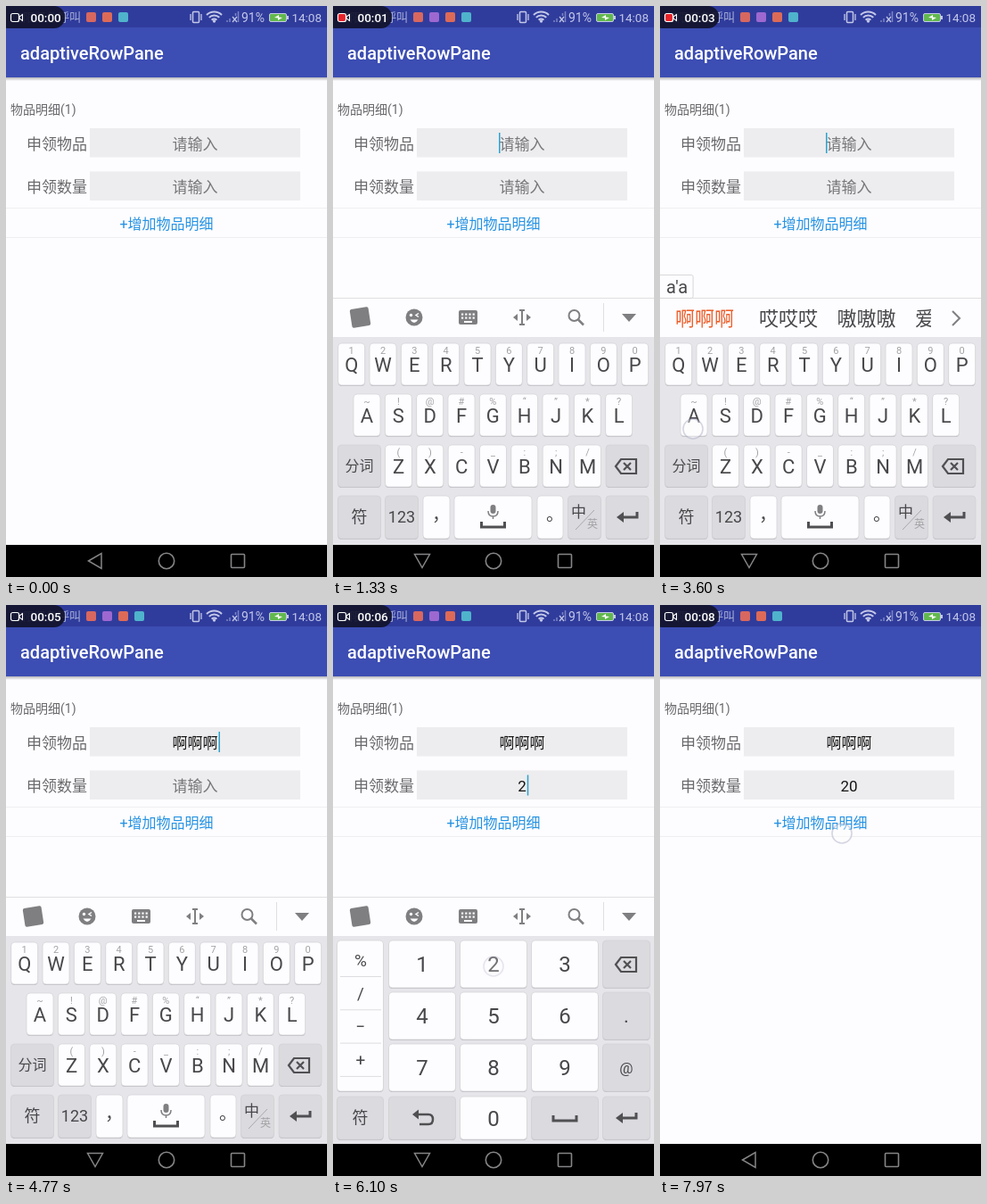
Animation, 360 px wide and 640 px high, one loop 8 s. Source, as an HTML page with a canvas:

```html
<!DOCTYPE html>
<html lang="zh-CN">
<head>
<meta charset="utf-8">
<style>
html, body { margin: 0; width: 100%; height: 100%; overflow: hidden; background: #fdfcfe; }
canvas { display: block; }
</style>
</head>
<body>
<canvas id="stage" width="360" height="640"></canvas>
<script>
const ctx = document.getElementById('stage').getContext('2d');
const FONT = 'Roboto, "Noto Sans CJK SC", sans-serif';
const LOOP = 8000, KB_TOP = 327, KB_HEIGHT = 313;
const KB_SHOW = 1065, QWERTY_HIDE = 5269, NUM_SHOW = 5650, KB_HIDE = 7031;
const COMMIT = 4550, FOCUS_2 = 5220, BLUR = 6990;
const PAPER = '#fdfcfe', ICON = '#7f7e81', INK = '#48474a', MARK = '#504f52', GRAY_KEY = '#dbdade';

const clamp = v => Math.max(0, Math.min(1, v));
const latest = (list, t) => list.filter(item => item[0] <= t).pop();

function rect(x, y, w, h, color) {
  ctx.fillStyle = color;
  ctx.fillRect(x, y, w, h);
}
function round(x, y, w, h, r, fill, stroke, width = 1) {
  ctx.beginPath();
  ctx.roundRect(x, y, w, h, r);
  paint(fill, stroke, width);
}
function circle(x, y, r, fill, stroke, width = 1) {
  ctx.beginPath();
  ctx.arc(x, y, r, 0, 7);
  paint(fill, stroke, width);
}
function paint(fill, stroke, width) {
  if (fill) { ctx.fillStyle = fill; ctx.fill(); }
  if (stroke) { ctx.strokeStyle = stroke; ctx.lineWidth = width; ctx.stroke(); }
}
function path(d, fill, stroke, width = 1.5) {
  const p = new Path2D(d);
  if (fill) { ctx.fillStyle = fill; ctx.fill(p); }
  if (stroke) { ctx.strokeStyle = stroke; ctx.lineWidth = width; ctx.stroke(p); }
}
// y is the visual middle of the line
function text(s, x, y, size, color, align = 'center', weight = 400) {
  ctx.font = `${weight} ${size}px ${FONT}`;
  ctx.textAlign = align;
  ctx.fillStyle = color;
  ctx.fillText(s, x, y + size * 0.36);
}

function statusBar(t, keyboardOn) {
  rect(0, 0, 360, 24, '#303c9c');
  text('仅限紧急呼叫', 6, 12.5, 13, '#a9b0da', 'left');
  const apps = keyboardOn ? ['#d8675f', '#9d68d0', '#dd6a57', '#4fb3cc'] : ['#d8675f', '#dd6a57', '#4fb3cc'];
  apps.forEach((c, i) => round(90 + i * 18, 7, 11, 11, 2, c));

  const pale = '#c3c8e8';
  round(209.5, 6.5, 7, 12, 1, null, pale, 1.5);
  path('M207 9V16M219 9V16', null, pale, 1.3);
  for (const r of [4, 8, 12]) {
    ctx.beginPath();
    ctx.arc(233.5, 18.5, r, -2.36, -0.78);
    paint(null, pale, 2);
  }
  circle(233.5, 17, 1.7, pale);
  path('M248 18V16M251 18V14M260.500 18V6M257.500 11V8', null, '#7b84c3', 1.5);
  path('M254 12L259 18M259 12L254 18', null, pale, 1.2);
  text('91%', 264, 13, 14, pale, 'left');
  round(295.5, 8.5, 19, 9, 1.5, '#62b84e', pale);
  rect(315, 11, 2, 4, pale);
  path('M301 13L306 10V12.500L310 13L305 16V13.500Z', '#fff');
  text('14:08', 354, 13, 13.5, pale, 'right');

  round(-10, 0, 76, 25, 12, 'rgba(17,18,42,.9)');
  const second = t / 1000, frac = second % 1;
  const red = frac >= 0.33 && frac < 0.67;
  round(5.5, 8.5, 9, 9, 2, red ? '#e8232a' : null, '#fff', 1.2);
  path('M15 12L18.500 9.500V16.500L15 14Z', null, '#fff', 1.1);
  text('00:0' + Math.floor(second + 0.33), 27.5, 13, 13.5, '#fff', 'left', 500);
}

function appBar() {
  rect(0, 24, 360, 56, '#3c4db3');
  const shade = ctx.createLinearGradient(0, 80, 0, 84);
  shade.addColorStop(0, 'rgba(0,0,0,.28)');
  shade.addColorStop(1, 'rgba(0,0,0,0)');
  rect(0, 80, 360, 4, shade);
  text('adaptiveRowPane', 16, 53, 20, '#fff', 'left', 500);
}

function field(label, y, value, cursor) {
  text(label, 23, y + 17.5, 17, '#69686b', 'left');
  rect(94, y, 236, 32.5, '#edecee');
  text(value || '请输入', 212, y + 17.5, 17, value ? '#151515' : '#777679');
  if (cursor) rect(value ? 213 + ctx.measureText(value).width / 2 : 186, y + 5, 1.5, 23, '#2ba3cf');
}

function form(t) {
  const restart = latest([[900], [3500], [COMMIT], [FOCUS_2], [6100], [6500]], t);
  const cursor = restart && t < BLUR && Math.floor((t - restart[0]) / 500) % 2 === 0;
  const amount = latest([[0, ''], [6100, '2'], [6500, '20']], t)[1];
  text('物品明细(1)', 5, 115.5, 14, '#69686b', 'left');
  field('申领物品', 137, t >= COMMIT ? '啊啊啊' : '', cursor && t < FOCUS_2);
  field('申领数量', 185.5, amount, cursor && t >= FOCUS_2);
  rect(0, 226, 360, 1, '#efeef0');
  rect(0, 259, 360, 1, '#efeef0');
  text('+增加物品明细', 180, 244.5, 16, '#2593e3');
}

function key(x, y, w, h, fill = PAPER) {
  round(x, y + 1, w, h, 4, '#c2c1c5');
  round(x, y, w, h, 4, fill, '#d2d1d5', 0.7);
}
function letterRow(letters, hints, x, y) {
  [...letters].forEach((c, i) => {
    const cx = x + i * 35.33;
    key(cx - 15, y, 30, 47);
    text(hints[i], cx, y + 8.5, 11, '#a3a2a5');
    text(c, cx, y + 24, 22, INK);
  });
}
function labelKey(s, x, y, w, h, size, fill) {
  key(x, y, w, h, fill);
  text(s, x + w / 2, y + h / 2, size, INK);
}
function backspace(x, y) {
  path(`M${x - 12} ${y}l6 -8h17v16h-17zM${x - 3} ${y - 4}l8 8m0 -8l-8 8`, null, MARK, 2.2);
}
function enter(x, y) {
  path(`M${x + 11} ${y - 6}v6h-17`, null, MARK, 3);
  path(`M${x - 12} ${y}l8 -6v12z`, MARK);
}
function spaceMark(x, y) {
  path(`M${x - 13} ${y - 6}v6h26v-6`, null, MARK, 3);
}

function toolbar() {
  ctx.save();
  ctx.translate(30.5, 349);
  ctx.rotate(-0.15);
  round(-10.5, -10.5, 21, 21, 2, ICON);
  ctx.restore();
  circle(91, 349, 9.5, ICON);
  circle(87.5, 346.5, 1.7, PAPER);
  path('M96 344.500L93 346.500L96 348.500', null, PAPER, 1.5);
  path('M86.500 351.500Q91 358.500 95.500 351.500Z', PAPER);
  round(141, 341, 21, 16, 2, ICON);
  for (let i = 0; i < 8; i++) rect(144 + i % 4 * 4.2, 344.5 + (i >> 2) * 4, 2.2, 2.2, PAPER);
  rect(147, 353, 9, 2, PAPER);
  path('M209 341H215M212 341V357M209 357H215', null, ICON, 2);
  path('M202 349L207 345V353ZM222 349L217 345V353Z', ICON);
  circle(270.5, 347, 6, null, ICON, 2);
  path('M275 351.500L281 357.500', null, ICON, 2.5);
  rect(303, 333, 1, 32, '#dfdee1');
  path('M324 345H340L332 354Z', ICON);
}

function candidates(words) {
  let x = 17;
  ctx.save();
  ctx.beginPath();
  ctx.rect(0, KB_TOP, 304, 45);
  ctx.clip();
  words.split(' ').forEach((word, i) => {
    text(word, x, 350, 22, i ? INK : '#ec5f2b', 'left', i ? 400 : 500);
    x += word.length * 22 + (i === 0 ? 28 : 21.5);
  });
  ctx.restore();
  path('M328 342L336 350L328 358', null, ICON, 2);
}

function qwerty() {
  letterRow('QWERTYUIOP', '1234567890', 20.7, 378);
  letterRow('ASDFGHJKL', '~!@#%“”*?', 38, 435);
  letterRow('ZXCVBNM', '()-_:;/', 73.5, 492);
  labelKey('分词', 5.5, 492, 48, 47, 16, GRAY_KEY);
  key(306, 492, 48, 47, GRAY_KEY);
  backspace(329, 516);
  labelKey('符', 5.5, 549, 48, 48, 18, GRAY_KEY);
  labelKey('123', 58.5, 549, 37, 48, 18, GRAY_KEY);
  key(101, 549, 30, 48);
  text('，', 121, 570, 20, INK);
  key(136, 549, 87, 48);
  round(176.5, 559, 6, 10, 3, ICON);
  path('M174 566Q174 572 179.500 572T185 566M179.500 572V575', null, ICON, 1.5);
  spaceMark(179.5, 584);
  key(229, 549, 29, 48);
  text('。', 249, 570, 20, INK);
  key(263.5, 549, 37, 48, GRAY_KEY);
  text('中', 275.5, 567, 17, INK);
  text('英', 291, 581, 12, '#a3a2a5');
  path('M272 587L293 565', null, '#a9a8ab', 1);
  key(306, 549, 48, 48, GRAY_KEY);
  enter(330, 573);
}

function numberPad() {
  key(4.5, 376, 52, 169);
  [...'%/−+'].forEach((c, i) => {
    text(c, 31, 398 + i * 37, 19, INK);
    rect(8, 416 + i * 37.3, 46, 1, '#dddce0');
  });
  for (let i = 0; i < 9; i++) {
    labelKey(String(i + 1), 62.5 + i % 3 * 80, 376 + Math.floor(i / 3) * 58, 75, 53, 24);
  }
  key(302.5, 376, 53, 53, GRAY_KEY);
  backspace(329, 403);
  labelKey('.', 302.5, 434, 53, 53, 22, GRAY_KEY);
  labelKey('@', 302.5, 492, 53, 53, 17, GRAY_KEY);
  labelKey('符', 4.5, 551, 52, 48, 18, GRAY_KEY);
  key(62.5, 551, 75, 48, GRAY_KEY);
  path('M94 571H107Q112 571 112 576.500T107 582H97', null, MARK, 2.5);
  path('M89 571L96 565.500V576.500Z', MARK);
  labelKey('0', 142.5, 551, 75, 48, 24);
  key(222.5, 551, 75, 48, GRAY_KEY);
  spaceMark(260, 578);
  key(302.5, 551, 53, 48, GRAY_KEY);
  enter(329, 575);
}

function keyboardOffset(t) {
  const slideIn = start => KB_HEIGHT * (1 - clamp((t - start) / 250)) ** 2;
  const slideOut = start => KB_HEIGHT * clamp((t - start) / 360) ** 2;
  if (t < QWERTY_HIDE) return slideIn(KB_SHOW);
  if (t < NUM_SHOW) return slideOut(QWERTY_HIDE);
  return t < KB_HIDE ? slideIn(NUM_SHOW) : slideOut(KB_HIDE);
}

function keyboard(t) {
  const offset = keyboardOffset(t);
  if (offset >= KB_HEIGHT) return;
  ctx.save();
  ctx.translate(0, Math.round(offset));
  rect(0, KB_TOP, 360, 45, PAPER);
  rect(0, KB_TOP, 360, 1, '#dfdee1');
  rect(0, 371, 360, 233, '#e6e5e9');
  rect(0, 604, 360, 36, '#000');

  const words = latest([[0, ''], [2780, '啊 阿 呵 吖 锕 嗄 爱'], [3160, '啊啊 阿啊 哎啊 爱啊'], [3560, '啊啊啊 哎哎哎 嗷嗷嗷 爱爱爱'], [COMMIT, '']], t)[1];
  const typed = latest([[0, ''], [2780, 'a'], [3160, "a'a"], [3660, "a'a'a"], [COMMIT, '']], t)[1];
  if (words) {
    candidates(words);
    ctx.font = `20px ${FONT}`;
    round(-1, 301.5, ctx.measureText(typed).width + 14, 26, 2, PAPER, '#d8d7da');
    text(typed, 7, 315, 20, INK, 'left');
  } else toolbar();
  t < NUM_SHOW ? qwerty() : numberPad();
  ctx.restore();
}

function navIcons(keyboardOn, faint) {
  ctx.globalAlpha = faint ? 0.25 : 1;
  const color = faint ? '#fff' : '#858587';
  path(keyboardOn ? 'M91.500 614.500H108.500L100 629.500Z' : 'M92.500 622L107 613.500V630.500Z', null, color);
  circle(180, 622, 8.7, null, color, 1.6);
  round(252.5, 614.5, 15, 15, 1, null, color, 1.6);
  ctx.globalAlpha = 1;
}

// start, end, x, y
const touches = [
  [600, 850, 212, 156], [2650, 2790, 37, 474], [3030, 3170, 37, 474], [3480, 3680, 37, 474],
  [4380, 4560, 50, 351], [5110, 5250, 212, 203], [5990, 6130, 180, 405],
  [6380, 6530, 180, 588], [6830, 7095, 238, 252], [7700, 8100, 204, 256]
];
function touchDot(t) {
  for (const [start, end, x, y] of touches) {
    if (t < start || t > end) continue;
    ctx.globalAlpha = clamp((t - start) / 50) * clamp((end - t) / 50);
    circle(x, y, 11, 'rgba(255,255,255,.4)', 'rgba(150,156,185,.4)', 1.6);
  }
  ctx.globalAlpha = 1;
}

function draw(t) {
  const keyboardOn = t >= KB_SHOW && t < KB_HIDE;
  rect(0, 0, 360, 640, PAPER);
  if (keyboardOn) rect(0, KB_TOP, 360, 277, '#f7f6f8');
  rect(0, 604, 360, 36, '#000');
  form(t);
  appBar();
  statusBar(t, keyboardOn);
  keyboard(t);
  const sliding = keyboardOffset(t);
  navIcons(keyboardOn, sliding > 20 && sliding < KB_HEIGHT);
  touchDot(t);
}

const begin = performance.now();
function tick() {
  draw((performance.now() - begin) % LOOP);
  requestAnimationFrame(tick);
}
tick();
</script>
</body>
</html>
```
